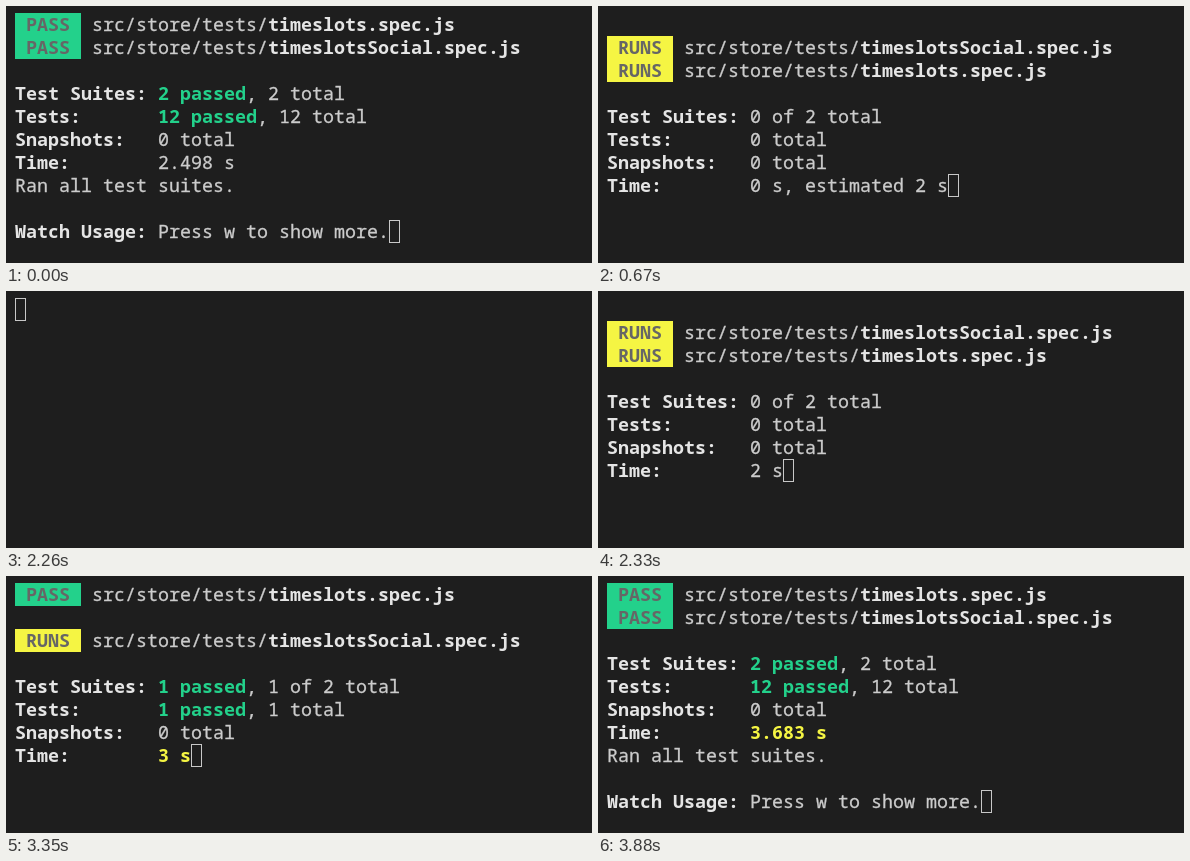
Recreate the animation shown at these times as an HTML page. Size 586 by 257 pixels, loop 4600 ms.

```html
<!DOCTYPE html>
<html lang="en">
<head>
<meta charset="utf-8">
<title>Test watcher</title>
<style>
  html, body { margin: 0; width: 100%; height: 100%; overflow: hidden; background: #1e1e1e; }
  #term {
    position: absolute; left: 9px; top: 6px; margin: 0;
    font: 18.3333px/23px "Noto Sans Mono", monospace;
    font-variant-ligatures: none;
    font-variant-numeric: slashed-zero;
    -webkit-text-stroke: 0.3px;
    color: #ccc;
  }
  b { color: #e5e5e5; -webkit-text-stroke: 0; }
  .green { color: #23d18b; }
  .yellow { color: #f5f543; }
  /* Cells sit one pixel below the text line. */
  .badge, i { display: inline-block; position: relative; top: 1px; height: 23px; vertical-align: top; }
  .badge { line-height: 21px; color: #666; }
  .pass { background: #23d18b; }
  .runs { background: #f5f543; }
  i { box-sizing: border-box; width: 11px; border: 1px solid #c8c8c8; }
</style>
</head>
<body>
<pre id="term"></pre>
<script>
const LOOP = 4600;
const term = document.getElementById('term');

const cursor = '<i></i>';
const bold = (text, cls = '') => `<b class="${cls}">${text}</b>`;
const row = (label, value) => bold(label.padEnd(13)) + value;
const file = (status, name) =>
  `${bold(` ${status} `, 'badge ' + status.toLowerCase())} src/store/tests/${bold(name + '.spec.js')}`;
const passed = (n, rest) => `${bold(n + ' passed', 'green')}, ${rest}`;
const screen = (...lines) => lines.join('\n') + cursor;

const summary = (suites, tests, time) => [
  row('Test Suites:', suites),
  row('Tests:', tests),
  row('Snapshots:', '0 total'),
  row('Time:', time)
];

const A = 'timeslots', B = 'timeslotsSocial';
const bothRunning = ['', file('RUNS', B), file('RUNS', A), ''];

const running = time => screen(...bothRunning, ...summary('0 of 2 total', '0 total', time));

const halfDone = time => screen(
  file('PASS', A), '', file('RUNS', B), '',
  ...summary(passed(1, '1 of 2 total'), passed(1, '1 total'), time)
);

const finished = time => screen(
  file('PASS', A), file('PASS', B), '',
  ...summary(passed(2, '2 total'), passed(12, '12 total'), time),
  'Ran all test suites.', '',
  row('Watch Usage:', 'Press w to show more.')
);

const cleared = screen('');
const firstKept = screen(file('PASS', A), '');

const timeline = [
  [0, finished('2.498 s')],
  [540, cleared],
  [605, screen('', '')],
  [670, running('0 s, estimated 2 s')],
  [1660, running('1 s, estimated 2 s')],
  [2260, cleared],
  [2330, running('2 s')],
  [2800, screen(file('PASS', A), ...bothRunning, ...summary('0 of 2 total', '0 total', '2 s'))],
  [2870, halfDone('2 s')],
  [3280, firstKept],
  [3350, halfDone(bold('3 s', 'yellow'))],
  [3810, firstKept],
  [3880, finished(bold('3.683 s', 'yellow'))]
];

let shown;
function render() {
  const t = performance.now() % LOOP;
  const [, html] = timeline.findLast(([start]) => start <= t);
  if (html !== shown) term.innerHTML = shown = html;
  requestAnimationFrame(render);
}
render();
</script>
</body>
</html>
```
